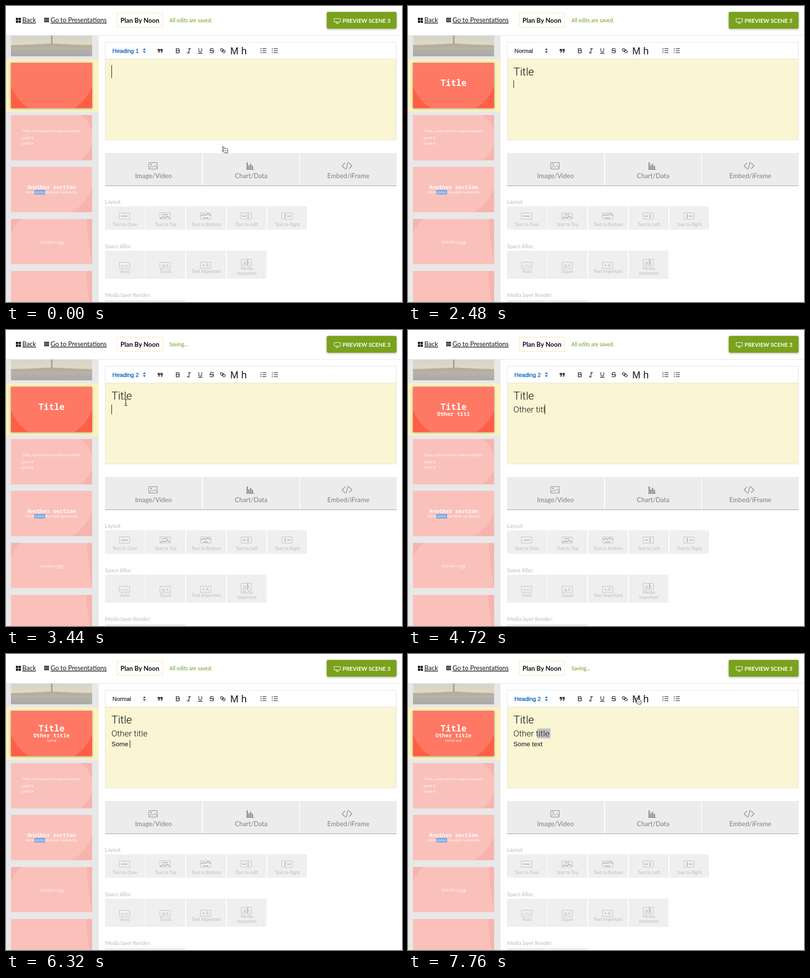
Write an HTML page that moves like this. It is 800 by 600 pixels and loops after 8 s.

```html
<!DOCTYPE html>
<html lang="en">
<head>
<meta charset="utf-8">
<title>Scene editor</title>
<style>
html, body { margin: 0; width: 100%; height: 100%; overflow: hidden; background: #fff; }
svg { display: block; width: 800px; height: 600px; }
text { white-space: pre; }
.lato { font-family: Lato, sans-serif; }
.arial { font-family: "Liberation Sans", Arial, sans-serif; }
.thin { font-family: Roboto, sans-serif; font-weight: 300; }
.mono { font-family: "Noto Sans Mono", "DejaVu Sans Mono", monospace; font-weight: 700; }
.open { font-family: "Open Sans", sans-serif; }
.bold { font-weight: 700; }
.mid { text-anchor: middle; }
.under { text-decoration: underline; }
.medium { stroke-width: .35px; }
.line { fill: none; stroke-width: 1; }
</style>
</head>
<body>
<svg viewBox="0 0 800 600" xmlns="http://www.w3.org/2000/svg">
  <defs>
    <linearGradient id="sky" x2="0" y2="1">
      <stop offset="0" stop-color="#d3d5cf"/><stop offset=".42" stop-color="#e0d8c2"/>
      <stop offset=".5" stop-color="#bdb5a6"/><stop offset="1" stop-color="#a9a9aa"/>
    </linearGradient>
    <filter id="shadow" x="-10%" y="-20%" width="120%" height="150%">
      <feDropShadow dx="0" dy="1" stdDeviation="2" flood-opacity=".35"/>
    </filter>
    <clipPath id="card"><rect width="164" height="92"/></clipPath>
  </defs>
  <g id="page"></g>
  <g id="live"></g>
</svg>
<script>
const LOOP = 8000, STEP = 80;
const BLUE = '#0a62c4', INK = '#3c3c3c', GREEN = '#6c9c1c', FAINT = '#bcbcbc';
const $ = id => document.getElementById(id);

const rect = (x, y, w, h, fill, more = '') =>
  `<rect x="${x}" y="${y}" width="${w}" height="${h}" fill="${fill}" ${more}/>`;
const text = (x, y, size, fill, cls, str, more = '') =>
  `<text x="${x}" y="${y}" font-size="${size}" fill="${fill}" class="${cls}" ${more}>${str}</text>`;
const line = (d, stroke, more = '') => `<path d="${d}" class="line" stroke="${stroke}" ${more}/>`;
const shape = (d, fill, more = '') => `<path d="${d}" fill="${fill}" ${more}/>`;
const at = (x, y, body, more = '') => `<g transform="translate(${x} ${y})" ${more}>${body}</g>`;

function header() {
  let s = rect(0, 0, 800, 59, '#fff') + rect(0, 59, 800, 1, '#e6e6e6');
  for (const x of [20, 25.5]) for (const y of [24, 29.5]) s += rect(x, y, 4.5, 4.5, '#111');
  for (const y of [24, 27.3, 30.6]) s += rect(77, y, 10, 2.2, '#111');
  s += text(33, 33, 13, '#111', 'lato under', 'Back');
  s += text(90, 33, 13, '#111', 'lato under', 'Go to Presentations');
  s += rect(224.5, 14.5, 92, 29, '#fff', 'stroke="#f3d67a" stroke-dasharray="3 2"');
  s += text(270.5, 34, 13, '#111', 'lato bold mid', 'Plan By Noon');
  s += rect(648, 12, 141, 34, '#7aa21c', 'rx="3" filter="url(#shadow)"');
  s += line('M663 25.5h12.500v7h-12.500zM669 32.500v2.500M666 35.300h6.500', '#fff');
  return s + text(680, 34, 11.2, '#fff', 'lato bold', 'PREVIEW SCENE 3');
}

function card(y, fill, corners, corner) {
  return at(10, y, rect(0, 0, 164, 92, fill) + shape(corners, corner), 'clip-path="url(#card)"');
}

function sidebar() {
  const pink = '#fac1bb', deep = '#f7b4ae';
  let s = rect(0, 60, 187, 540, '#e8e8e8');
  s += rect(10, 60, 164, 42, 'url(#sky)') + rect(91, 60, 3, 19, '#a99f8a');
  s += shape('M10 80L92 76L174 80V84H10Z', '#b5ad9e');
  s += rect(0, 108, 187, 106, '#fbf2bf');
  s += rect(10, 115, 164, 92, '#ff5e44', 'filter="url(#shadow)"');
  s += at(10, 115, '<circle cx="82" cy="18" r="87" fill="#ff7863"/>', 'clip-path="url(#card)"');
  s += card(221, pink, 'M140 0Q160 12 164 36V0ZM164 60Q156 80 140 92H164Z', deep);
  s += card(326, pink, 'M164 42Q152 75 122 92H164Z', deep);
  s += card(431.5, pink, 'M0 30Q8 10 22 0H0ZM153 0Q156 50 164 92V0Z', deep);
  s += card(537, pink, 'M152 0Q155 50 164 92V0Z', deep);
  s += text(92.5, 255.5, 7.3, '#fff', 'open mid', 'Then, some text to make a context.');
  s += text(28, 269.5, 7, '#fff', 'open', '- point A') + text(28, 280.5, 7, '#fff', 'open', '- point B');
  s += text(92, 371, 10.9, '#fff', 'mono mid', 'Another section');
  s += rect(57, 373, 22, 9, '#79a5e2');
  s += text(92, 380, 7.4, '#fff', 'open mid', 'Here some text with variations');
  return s + text(92, 481, 7.2, '#fff', 'open mid', 'End with a <tspan class="under">link</tspan>');
}

function toolbar() {
  let s = rect(200.5, 73.5, 588, 198, '#fff', 'stroke="#e3e3e3"');
  s += rect(201, 107, 587, 164, '#faf5d2') + rect(201, 107, 587, 1, '#e6e3cf');
  for (const x of [306.5, 312]) s += shape(`M${x} 87h4.500v3.500q0 4-3.200 4.700l-.5-1q1.700-.7 1.700-2.700h-2.500z`, INK);
  s += line('M344 86.500h3.500q2.500 0 2.500 2t-2.500 2h-3.500zM344 90.500h4q2.500 0 2.500 2.200t-2.500 2.200h-4z', INK, 'style="stroke-width:1.5"');
  s += line('M368 86.500h5.500M365.500 95h5.500M371 86.500l-2.500 8.500', INK, 'style="stroke-width:1.4"');
  s += line('M389.500 85.500v4.500q0 3.500 3 3.500t3-3.500v-4.500M388 96h9', INK, 'style="stroke-width:1.3"');
  s += line('M419 88q-.5-2-3.300-2t-3.200 2q0 1.500 3.200 2.500 3.500.8 3.500 2.500 0 2-3.500 2t-3.500-2M411 90.500h9.500', INK, 'style="stroke-width:1.3"');
  s += at(438, 90.5, '<rect x="-5.500" y="-2" width="6.500" height="4.500" rx="2.200"/><rect x="-1" y="-2.500" width="6.500" height="4.500" rx="2.200"/>',
    `class="line" style="stroke-width:1.300" stroke="${INK}"`).replace('translate(438 90.5)', 'translate(438 90.5) rotate(42)');
  s += text(453, 97.5, 20, '#111', 'arial', 'M h');
  [514, 537].forEach((x, i) => {
    for (const y of [86.5, 90.5, 94.5]) {
      s += line(`M${x + 4} ${y}h8`, INK, 'style="stroke-width:1.3"');
      s += i ? rect(x, y - .8, 1.8, 1.6, INK) : rect(x + .5, y - 1.3, 1.3, 2.6, INK);
    }
  });
  return s;
}

function mediaButtons() {
  const grey = '#8a8a8a';
  let s = '';
  [[200, 196, 'Image/Video'], [398, 194.500, 'Chart/Data'], [594, 195, 'Embed/iFrame']].forEach(([x, w, name]) => {
    s += rect(x, 298, w, 66, '#ececec') + text(x + w / 2, 348.5, 13.2, '#808080', 'lato mid', name);
  });
  s += rect(200, 364, 589, 1, '#a2a2a2');
  s += line('M288.500 317.500h17v13h-17zM290 329l4-5 3 3 4-4 4 5', grey) + '<circle cx="293" cy="321" r="1.300" fill="#8a8a8a"/>';
  [[486, 317], [489.5, 323], [493, 320], [496.500, 324]].forEach(([x, y]) => s += rect(x, y, 2.5, 331 - y, grey));
  s += line('M485 331.500h17', grey);
  return s + line('M685 318l-6 6 6 6M693 318l6 6-6 6M691.500 316l-5 16', grey, 'style="stroke-width:1.3"');
}

function option(col, y, h, label, glyph) {
  const x = 200 + col * 82, lines = label.split('|'), cx = x + 40.5;
  const base = y + h - (lines.length > 1 ? 18 : h > 50 ? 12 : 7.5), iconY = base - 27 + (h > 50 ? 5 : 0);
  let s = rect(x, y, col ? 80 : 81, h, '#efefef');
  s += at(cx - 11.5, iconY + .5, line('M0 0h21v12.500h-21z', '#c2c2c2') + glyph);
  lines.forEach((str, i) => s += text(cx, base + i * 10, 9.1, FAINT, 'lato mid', str));
  return s;
}

function options() {
  const mark = d => line(d, '#aaa', 'style="stroke-width:1.5"');
  const label = (str, size = 6) => text(10.5, 9, size, FAINT, 'lato mid', str);
  const hill = 'l5-3 4 2 5-3 6 4';
  let s = text(200, 401, 10.6, FAINT, 'lato', 'Layout');
  [['Text to Over', 'M4 6.500h13'], ['Text to Top', 'M5 3.500h11M1 11' + hill], ['Text to Bottom', 'M5 10h11M1 6' + hill],
    ['Text to Left', 'M3 6.500h7M14 2v9'], ['Text to Right', 'M11 6.500h7M7 2v9']]
    .forEach(([name, d], i) => s += option(i, 406, 47.5, name, mark(d)));
  s += text(200, 490.500, 10.6, FAINT, 'lato', 'Space Alloc');
  [['Auto', label('AUTO', 5.5)], ['Equal', label('▧ A', 7)], ['Text Important', label('▪ A', 10)],
    ['Media|Important', label('▧ A', 7) + mark('M13 0v12')]]
    .forEach(([name, glyph], i) => s += option(i, 496, 57, name, glyph));
  s += text(200, 590, 10.6, FAINT, 'lato', 'Media layer Render:');
  return s + rect(200, 596, 81, 4, '#efefef') + rect(282.500, 596, 80, 4, '#efefef');
}

// Typed strings: [time of first key, step, text]
const pen = document.createElement('canvas').getContext('2d');
const width = (font, str) => (pen.font = font, pen.measureText(str).width);
const latest = (list, t) => list.reduce((found, item) => t >= item[0] ? item[1] : found, list[0][1]);
const typed = (t, keys, str) => str.slice(0, keys.filter(k => t >= k).length);
const within = (t, spans) => spans.some(([a, b]) => t >= a && t < b);
const run = (from, n) => Array.from({ length: n }, (_, i) => from + i * STEP);

const KEYS1 = [1200, 1280, 1280, 1360, 1760];
const KEYS2 = [...run(3920, 5), ...run(4400, 6)];
const KEYS3 = [...run(6000, 6), 6400, 6560, 6560];
const STYLES = [[0, 'Heading 1'], [2000, 'Normal'], [3280, 'Heading 2'], [5520, 'Normal'], [7200, 'Heading 2']];
const STATUS = [[0, 'All edits are saved.'], [2960, 'Saving...'], [4080, 'All edits are saved.'], [7200, 'Saving...']];
const CARET_OFF = [[80, 560], [1600, 1760], [2320, 2480], [2960, 3280], [3760, 3920], [5200, 5520], [5840, 6000], [7040, LOOP]];
const PATHS = [
  [[0, 442, 291], [80, 430, 270], [160, 392, 200], [240, 335, 122], [320, 311, 93], [480, 311, 93],
    [640, 303, 130], [800, 293, 172], [960, 291, 161], [1200, 291, 161]],
  [[2720, 291, 161], [2880, 252, 100], [3040, 250, 99], [3200, 248, 152], [3280, 246, 152], [3440, 242, 147],
    [3520, 242, 147], [3760, 312, 205], [3920, 312, 205]],
  [[4960, 312, 205], [5040, 323, 212], [5120, 323, 212], [5360, 293, 182], [5520, 293, 182]],
  [[6800, 293, 182], [7040, 275, 161], [7280, 275, 161], [7600, 438, 121], [7760, 465, 95], [LOOP, 465, 95]]
];

function pointer(t) {
  const path = PATHS.find(p => t >= p[0][0] && t < p[p.length - 1][0]);
  if (!path) return null;
  const i = path.findIndex(p => p[0] > t), [t0, x0, y0] = path[i - 1], [t1, x1, y1] = path[i];
  const k = (t - t0) / (t1 - t0);
  return { x: x0 + (x1 - x0) * k, y: y0 + (y1 - y0) * k };
}

function drawPointer({ x, y }, hand) {
  if (!hand) return at(x, y, line('M-3-6.500q3 0 3 2 0-2 3-2M0-4.500v9M-3 6.500q3 0 3-2 0 2 3 2M-1.500 2h3', '#222'));
  return at(x, y, shape('M-4.800-5.300q1-1.600 2.300-.2L-.6-2q.9-1.200 2-.1 1.100-.9 2 .2 1.300-.6 1.900.8l.8 4.200-.6 3.400-5 .5-1.500-1.700-4-2.300q-1.300-1.200.2-1.900l2.300.5z',
    '#fff', 'stroke="#222" stroke-width="1" stroke-linejoin="round"') + line('M.5 1.200l.6 2.500M2.300 1l.5 2.500', '#222', 'style="stroke-width:.7"'));
}

function thumbnail(t, a, b, c) {
  const titleY = t < 2000 ? 167 : t < 3280 ? 162.3 : t < 5520 ? 161.5 : 156.5;
  return text(92, titleY, 17.5, '#fff', 'mono mid', a)
    + text(92, t < 5520 ? 173.500 : 168.700, 11.07, '#fff', 'mono mid', b)
    + text(92, 178, 7.4, '#fff', 'open mid', c.trim());
}

function picker(t, open, mouse) {
  const name = latest(STYLES, t);
  const color = open ? '#c8c8c8' : name === 'Normal' ? INK : BLUE;
  const label = (y, size, fill, str) => text(215, y, size, fill, 'arial medium', str, `stroke="${fill}"`);
  let s = open ? rect(206, 79, 83.5, 22.5, '#fff', 'stroke="#b9b9b9" stroke-width="2" filter="url(#shadow)"') : '';
  s += label(94.5, 11.7, color, name);
  s += shape('M276.500 89.300l3-3.500 3 3.500zM276.500 91.700l3 3.500 3-3.500z', color);
  if (!open) return s;
  s += rect(208, 100.5, 121, 90.5, '#fff', 'stroke="#ddd" stroke-width=".5" filter="url(#shadow)"');
  const items = [['Heading 1', 129, 23, 106], ['Heading 2', 158, 17.7, 138], ['Normal', 181, 11.8, 166]];
  items.forEach(([str, y, size, top], i) => {
    const bottom = i < 2 ? items[i + 1][3] : 190;
    s += label(y, size, mouse && mouse.y >= top && mouse.y < bottom ? BLUE : '#444', str);
  });
  return s;
}

function editor(t, a, b, c) {
  const fonts = ['300 22px Roboto, sans-serif', '300 17.1px Roboto, sans-serif', '13px "Liberation Sans", Arial, sans-serif'];
  const row = t < 2000 ? 0 : t < 5520 ? 1 : 2;
  let s = t >= 7200 ? rect(261, 151, 27, 20, '#c4c4c6') : '';
  s += text(213, 141, 22, '#111', 'thin', a) + text(213, 167, 17.1, '#111', 'thin', b) + text(213, 186.5, 13, '#111', 'arial', c);
  if (within(t, CARET_OFF)) return s;
  const [y, h] = [[120, 26], [151, t < 3280 ? 15 : 20], [175, 15]][row];
  const x = Math.floor(213 + width(fonts[row], [a, b, c][row]));
  return s + rect(x, y, 1, h, '#111');
}

function live(t) {
  const a = typed(t, KEYS1, 'Title'), b = typed(t, KEYS2, 'Other title'), c = typed(t, KEYS3, 'Some text');
  const open = t >= 2960 && t < 3280, mouse = pointer(t);
  let s = text(330, 33, 10.6, GREEN, 'lato', latest(STATUS, t));
  s += thumbnail(t, a, b, c) + editor(t, a, b, c) + picker(t, open, mouse);
  if (mouse) s += drawPointer(mouse, open || mouse.y < 107 || mouse.y > 272);
  return s;
}

$('page').innerHTML = header() + sidebar() + toolbar() + mediaButtons() + options();
const start = performance.now();
let shown = -1;
function tick() {
  const t = Math.floor((performance.now() - start) % LOOP / STEP) * STEP;
  if (t !== shown) $('live').innerHTML = live(shown = t);
  requestAnimationFrame(tick);
}
tick();
</script>
</body>
</html>
```
